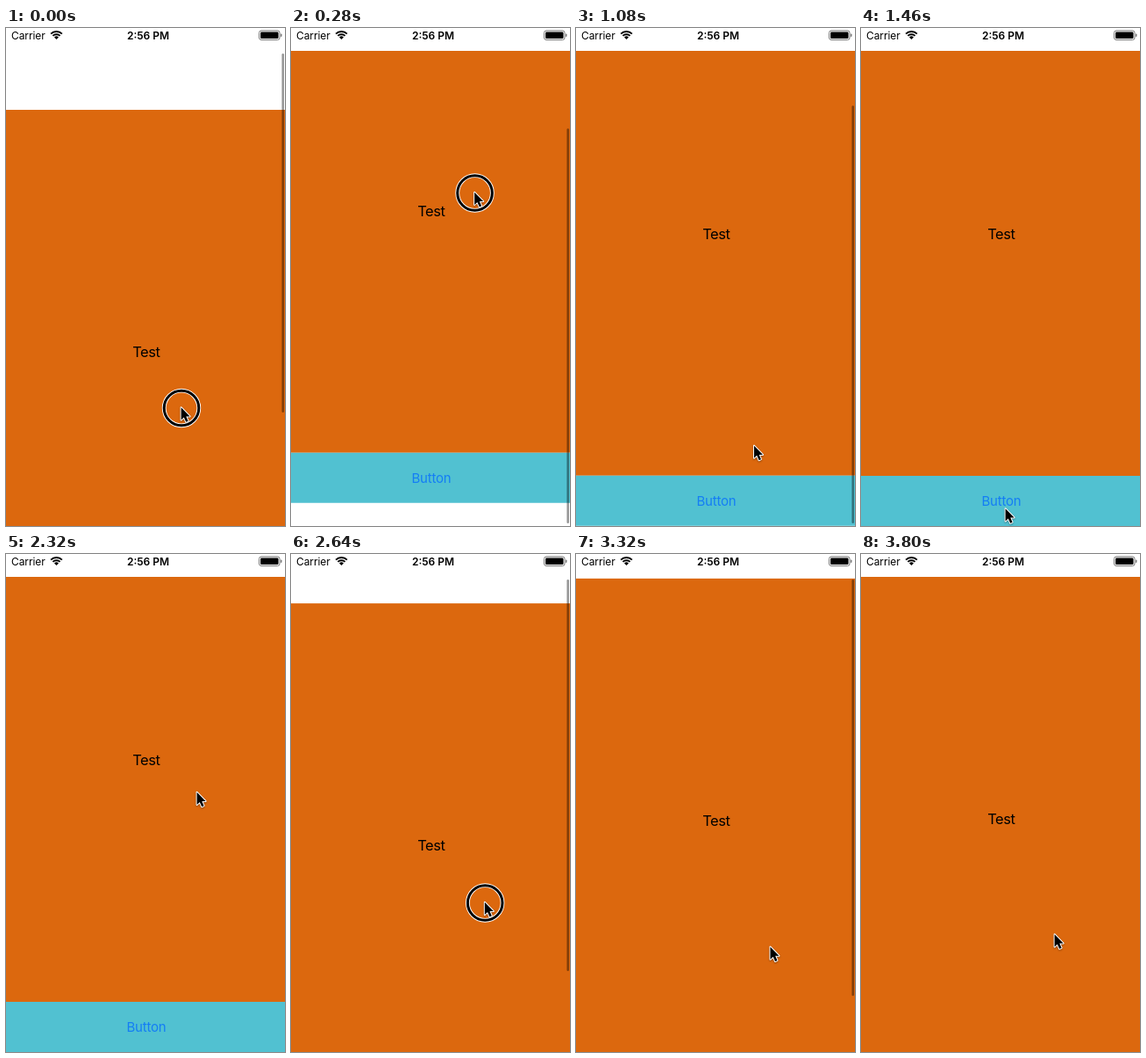
An HTML page with a canvas for the animation above (4300 ms loop, 318 by 566 pixels).

```html
<!DOCTYPE html>
<html lang="en">
<head>
<meta charset="utf-8">
<title>Bouncing scroll view</title>
<style>
  html, body { margin: 0; width: 100%; height: 100%; overflow: hidden; background: #fff; }
  canvas { display: block; width: 318px; height: 566px; }
</style>
</head>
<body>
<canvas id="stage"></canvas>
<script>
const W = 318, H = 566, LOOP = 4300, STEP = 20;
const TOP = 26, VIEW = H - TOP;
const PANEL = 550, BUTTON = 57, MAX = PANEL + BUTTON - VIEW;
const FONT = 'Inter, Roboto, sans-serif';

const canvas = document.getElementById('stage');
const ctx = canvas.getContext('2d');
const dpr = window.devicePixelRatio || 1;
canvas.width = W * dpr;
canvas.height = H * dpr;

// Pointer tip: time, x, y
const path = [
  [0, 199, 430], [363, 210, 148], [430, 210, 148], [760, 234.5, 413.5],
  [1440, 164, 545], [2140, 164, 545], [2310, 217, 269.5], [2390, 217, 269.5],
  [2810, 222, 464.5], [3100, 222, 464.5], [3500, 220, 431]
];

// Times of press and release
const touches = [[-300, 400], [1640, 1790], [2350, 2830]];

const clamp = v => Math.max(0, Math.min(1, v));
const ramp = (t, a, b) => clamp((t - a) / (b - a));
const smooth = p => p * p * (3 - 2 * p);
const mix = (a, b, p) => a + (b - a) * p;

function pointer(t) {
  let i = 0;
  while (i < path.length - 2 && t >= path[i + 1][0]) i++;
  const [t0, x0, y0] = path[i], [t1, x1, y1] = path[i + 1];
  const p = smooth(ramp(t, t0, t1));
  return { x: mix(x0, x1, p), y: mix(y0, y1, p) };
}

// Resistance beyond either end of the content
function rubber(raw) {
  const pull = d => VIEW * (1 - 1 / (1 + d * 0.55 / VIEW));
  if (raw < 0) return -pull(-raw);
  return raw > MAX ? MAX + pull(raw - MAX) : raw;
}

// Critically damped return to the edge
function settle(from, to, ms) {
  const x = 10.93 * ms / 1000;
  return to + (from - to) * (1 + x) * Math.exp(-x);
}

const dragUp = t => rubber(-139.07 + (430 - pointer(t).y) * 1.048);
const dragDown = t => rubber(MAX - (pointer(t).y - 269.5));

function scrollAt(t) {
  if (t < 400) return dragUp(t);
  if (t < 1100) return settle(dragUp(400), MAX, t - 400);
  if (t < 2350) return MAX;
  if (t < 2830) return dragDown(t);
  return t < 3600 ? settle(dragDown(2830), 0, t - 2830) : 0;
}

function barAlpha(t) {
  if (t < 2400) return 1 - ramp(t, 1100, 1380);
  return 1 - ramp(t, 3520, 3800);
}

function rect(x, y, w, h, color) {
  ctx.fillStyle = color;
  ctx.fillRect(x, y, w, h);
}

function pill(x, y, w, h, r) {
  ctx.beginPath();
  ctx.roundRect(x, y, w, h, r);
}

function text(str, x, y, size, o = {}) {
  ctx.font = `${o.weight || 400} ${size}px ${FONT}`;
  ctx.letterSpacing = (o.spacing || 0) + 'px';
  ctx.textAlign = o.align || 'center';
  ctx.fillStyle = o.color || '#000';
  ctx.fillText(str, x, y);
}

function drawContent(s, t) {
  const y = TOP - s;
  rect(0, y, W, PANEL, '#dc680e');
  rect(0, y + PANEL, W, BUTTON, '#51c1d1');
  text('Test', 159.8, y + 281, 16.5, { spacing: -0.5 });
  const pressed = t >= 1640 && t < 1960;
  ctx.globalAlpha = pressed ? mix(0.2, 1, ramp(t, 1720, 1960)) : 1;
  text('Button', 160, y + PANEL + 34, 15, { spacing: -0.2, color: '#147df5' });
  ctx.globalAlpha = 1;
}

function drawStatus() {
  rect(0, 0, W, TOP, '#fff');
  text('Carrier', 6, 12.5, 12, { align: 'left', spacing: -0.1 });
  text('2:56 PM', 162, 12.5, 12, { weight: 600 });

  // Signal arcs
  const cx = 57.5, cy = 13, a = Math.PI / 4;
  ctx.strokeStyle = ctx.fillStyle = '#000';
  ctx.lineWidth = 2;
  for (const r of [9, 5.8]) {
    ctx.beginPath();
    ctx.arc(cx, cy, r, -Math.PI / 2 - a, -Math.PI / 2 + a);
    ctx.stroke();
  }
  ctx.beginPath();
  ctx.moveTo(cx, cy);
  ctx.arc(cx, cy, 3.5, -Math.PI / 2 - a, -Math.PI / 2 + a);
  ctx.fill();

  // Battery
  ctx.lineWidth = 1;
  ctx.strokeStyle = '#777';
  pill(288.5, 3, 23.5, 10.5, 2.5);
  ctx.stroke();
  ctx.fillStyle = '#000';
  pill(290, 4.5, 20.5, 7.5, 1.2);
  ctx.fill();
  ctx.fillStyle = '#777';
  pill(313, 6.5, 1.4, 3.5, 0.7);
  ctx.fill();
}

function drawBar(s, alpha) {
  if (alpha <= 0) return;
  const y0 = 29, track = 534, full = track * VIEW / (PANEL + BUTTON);
  const over = Math.max(0, -s, s - MAX);
  const h = full - over;
  const y = y0 + clamp(s / MAX) * (track - h);
  ctx.fillStyle = `rgba(0,0,0,${0.42 * alpha})`;
  pill(314.4, y, 2.5, h, 1.25);
  ctx.fill();
}

function drawRing(x, y, t) {
  for (const [down, up] of touches) {
    if (t < down || t >= up + 150) continue;
    const grow = ramp(t, up, up + 150);
    const r = 19.8 + 3 * Math.max(grow, 1 - ramp(t, down, down + 100));
    ctx.globalAlpha = Math.min(1 - grow, mix(0.4, 1, ramp(t, down, down + 80)));
    for (const [width, color] of [[4.8, '#fff'], [3, '#000']]) {
      ctx.beginPath();
      ctx.arc(x, y, r, 0, Math.PI * 2);
      ctx.lineWidth = width;
      ctx.strokeStyle = color;
      ctx.stroke();
    }
    ctx.globalAlpha = 1;
  }
}

function drawArrow(x, y) {
  const pts = [[0, 0], [0, 14.2], [3.2, 11.2], [5.6, 16.6], [8, 15.5], [5.7, 10.3], [10, 10.3]];
  ctx.save();
  ctx.translate(x + 0.6, y + 1.2);
  ctx.beginPath();
  pts.forEach(([px, py]) => ctx.lineTo(px, py));
  ctx.closePath();
  ctx.lineJoin = 'round';
  ctx.lineWidth = 2;
  ctx.strokeStyle = '#fff';
  ctx.shadowColor = 'rgba(0,0,0,.35)';
  ctx.shadowBlur = 2 * dpr;
  ctx.shadowOffsetY = dpr;
  ctx.stroke();
  ctx.shadowColor = 'transparent';
  ctx.fillStyle = '#000';
  ctx.fill();
  ctx.restore();
}

function draw(t) {
  const s = scrollAt(t), p = pointer(t);
  ctx.setTransform(dpr, 0, 0, dpr, 0, 0);
  rect(0, 0, W, H, '#fff');
  drawContent(s, t);
  drawStatus();
  drawBar(s, barAlpha(t));
  drawRing(p.x + 1, p.y + 2, t);
  drawArrow(p.x, p.y);
}

const start = performance.now();
function tick() {
  const t = (performance.now() - start) % LOOP;
  draw(Math.floor(t / STEP) * STEP);
  requestAnimationFrame(tick);
}
tick();
</script>
</body>
</html>
```
